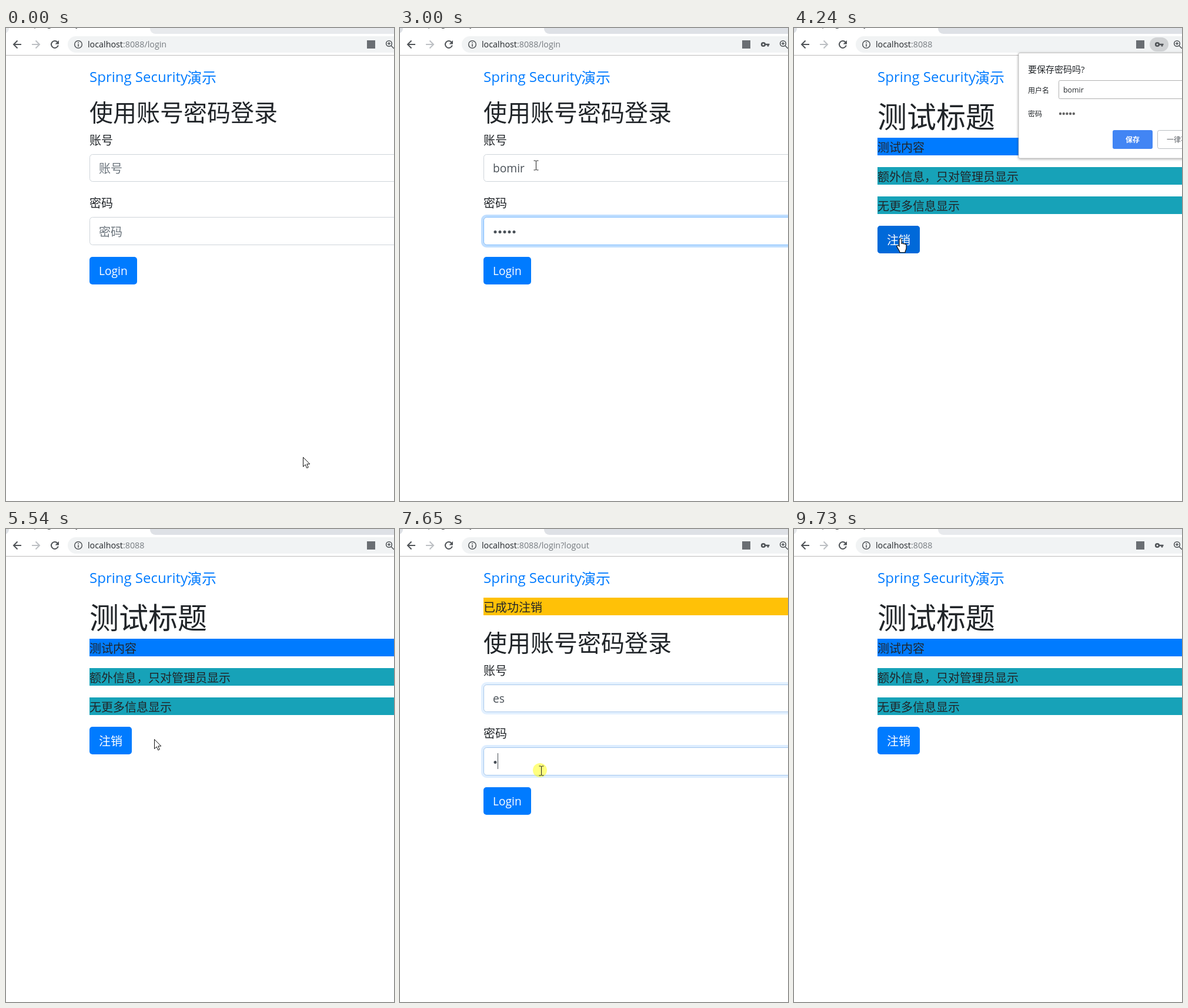
Recreate the animation shown at these times as an HTML page. Size 660 by 806 pixels, loop 9810 ms.

```html
<!DOCTYPE html>
<html lang="zh-CN">
<head>
<meta charset="utf-8">
<title>Spring Security演示</title>
<style>
  html, body { margin: 0; width: 100%; height: 100%; overflow: hidden; background: #fff; }
  svg { display: block; width: 660px; height: 806px; }
  text { font: 20px 'Open Sans', 'Noto Sans CJK SC', 'Noto Sans CJK', sans-serif; fill: #212529; white-space: pre; }
  .latin { font-size: 19.2px; }
  .brand { font-size: 25px; fill: #007bff; }
  .brand.latin { font-size: 24px; }
  .h2 { font-size: 40px; }
  .h1 { font-size: 50px; }
  .value { fill: #495057; }
  .hint { fill: #6c757d; }
  .white { fill: #fff; }
  .url { font-size: 14.3px; }
  .small { font-size: 12px; }
  .blue { fill: #007bff; }
  .teal { fill: #17a2b8; }
  .hover { fill: #0069d9; }
  .active { fill: #0062cc; }
  .field { fill: #fff; stroke: #ced4da; }
  .ring { fill: none; stroke: #007bff; stroke-width: 4; stroke-opacity: .25; }
  .ring.strong { stroke-opacity: .5; }
  .edge { fill: none; stroke: #80bdff; }
  .icon { fill: none; stroke: #505458; stroke-width: 2; }
  .bubble { filter: drop-shadow(0 1px 2px rgba(0, 0, 0, .35)); }
</style>
</head>
<body>
<svg viewBox="0 0 660 806">
  <!-- browser chrome -->
  <g id="strip">
    <rect x="-20" y="-20" width="25" height="29" rx="8"/>
    <rect x="245" y="-20" width="440" height="30" rx="9"/>
  </g>
  <text class="small" x="41" y="-2">Spring Security</text>
  <path class="icon" d="M26 28H13M19.5 21.5L13 28l6.500 6.500"/>
  <path class="icon" style="stroke:#bdc0c4" d="M44 28h13M50.500 21.500L57 28l-6.500 6.500"/>
  <g id="reload">
    <path class="icon" d="M87.500 24A6 6 0 1 0 88.800 29.500"/>
    <path fill="#505458" d="M90 21v6.500h-6.500z"/>
  </g>
  <path class="icon" data-on="8150-8260" d="M77.500 22.500l11 11m0-11l-11 11"/>
  <rect x="105" y="14" width="600" height="28" rx="14" fill="#f1f3f4"/>
  <circle class="icon" cx="123" cy="28" r="6.300" style="stroke-width:1.500"/>
  <path class="icon" d="M123 24.300v1.800m0 1.200v4.400" style="stroke-width:1.600"/>
  <text class="url" x="139" y="33">localhost<tspan id="path" fill="#777c81"></tspan></text>
  <rect id="badge" y="21" width="14" height="14" fill="#6a6e73"/>
  <rect data-on="3990-5200" x="605" y="16" width="32" height="24" rx="12" fill="#d0d2d4"/>
  <g id="key">
    <circle class="icon" cx="618" cy="28" r="2.800" style="stroke-width:2.600"/>
    <path class="icon" d="M621 28h7.500M626 28v3.500" style="stroke-width:2.600"/>
  </g>
  <circle class="icon" cx="651.500" cy="26.500" r="4.800" style="stroke-width:1.600"/>
  <path class="icon" d="M655 30l5 5M649 26.500h5m-2.500-2.500v5" style="stroke-width:1.500"/>
  <rect y="46" width="660" height="1" fill="#bdbaba"/>

  <text class="brand latin" x="142" y="92">Spring Security</text>
  <text class="brand" x="308" y="93.500">演示</text>

  <!-- sign-in page -->
  <g data-on="6240-8260">
    <rect x="142" y="117" width="518" height="30" fill="#ffc107"/>
    <text x="142" y="140.500">已成功注销</text>
  </g>
  <g id="login" data-on="0-3850 6240-8260">
    <text class="h2" x="142" y="159">使用账号密码登录</text>
    <text x="142" y="198.500">账号</text>
    <rect class="field" x="142.500" y="215.500" width="800" height="46" rx="5"/>
    <g data-on="720-1900 6785-7570" data-fade="150">
      <rect class="ring" x="140" y="213" width="805" height="51" rx="7"/>
      <rect class="edge" x="142.500" y="215.500" width="800" height="46" rx="5"/>
    </g>
    <text class="hint" id="userHint" x="158" y="246.500">账号</text>
    <text class="value latin" id="user" x="158" y="246"></text>

    <text x="142" y="305.500">密码</text>
    <rect class="field" x="142.500" y="322.500" width="800" height="47" rx="5"/>
    <g data-on="1900-3650 7570-8040" data-fade="150">
      <rect class="ring" x="140" y="320" width="805" height="52" rx="7"/>
      <rect class="edge" x="142.500" y="322.500" width="800" height="47" rx="5"/>
    </g>
    <text class="hint" id="passHint" x="158" y="354.500">密码</text>
    <g id="dots" fill="#495057"></g>
    <rect id="caret" width="1" height="27" fill="#495057"/>

    <rect class="ring strong" data-on="3650-3850 8050-8260" data-fade="130" x="140" y="388" width="85" height="51" rx="7"/>
    <rect class="blue" x="142" y="390" width="81" height="47" rx="5"/>
    <rect class="hover" data-on="3480-3850 7890-8260" data-fade="100" x="142" y="390" width="81" height="47" rx="5"/>
    <rect class="active" data-on="3650-3850 8050-8260" data-fade="100" x="142" y="390" width="81" height="47" rx="5"/>
    <text class="white latin" x="158" y="421">Login</text>
  </g>

  <!-- home page -->
  <g data-on="3850-6240 8260-9810">
    <text class="h1" x="142" y="170">测试标题</text>
    <rect class="blue" x="142" y="187" width="518" height="30"/>
    <text x="142" y="210.500">测试内容</text>
    <rect class="teal" x="142" y="237" width="518" height="30"/>
    <text x="142" y="260.500">额外信息，只对管理员显示</text>
    <rect class="teal" x="142" y="287" width="518" height="30"/>
    <text x="142" y="310.500">无更多信息显示</text>
    <rect class="ring strong" data-on="5940-6240" data-fade="150" x="140" y="335" width="76" height="51" rx="7"/>
    <rect class="blue" x="142" y="337" width="72" height="47" rx="5"/>
    <rect class="hover" data-on="4110-4420 5680-6240" data-fade="100" x="142" y="337" width="72" height="47" rx="5"/>
    <rect class="active" data-on="5940-6240" data-fade="100" x="142" y="337" width="72" height="47" rx="5"/>
    <text class="white" x="158" y="368.500">注销</text>
  </g>

  <!-- save-password bubble -->
  <g data-on="3990-5160" data-fade="80">
    <rect class="bubble" x="382" y="42.500" width="320" height="179.500" rx="2" fill="#fff" stroke="#b4b4b4" stroke-width=".7"/>
    <text x="398" y="76" style="font-size:15px">要保存密码吗?</text>
    <text class="small" x="398" y="110.500">用户名</text>
    <rect x="450.500" y="89.500" width="240" height="31" rx="2" fill="#fff" stroke="#b0b0b0"/>
    <text x="458" y="110" style="font-size:12.400px">bomir</text>
    <text class="small" x="398" y="150.500">密码</text>
    <g id="savedDots" fill="#666"></g>
    <rect x="542" y="174" width="68" height="32" rx="3" fill="#4285f4"/>
    <text class="small white" x="576" y="194.500" text-anchor="middle" font-weight="700" style="font-weight:700">保存</text>
    <rect x="618.500" y="174.500" width="110" height="31" rx="3" fill="#fff" stroke="#b9bdc1"/>
    <text class="small" x="634" y="194.500" style="fill:#5f6368">一律不保存</text>
  </g>

  <!-- pointer -->
  <g id="pointer">
    <circle data-on="700-820 3650-3770 5090-5180 5940-6060 6750-6880 7570-7680 8050-8150" cx="-2" cy="-1" r="12" fill="#ffff00" fill-opacity=".5"/>
    <path data-shape="arrow" fill="#fff" stroke="#111" d="M.500 .500v16l3.700-3.500 2.500 5.800 2.600-1.100-2.500-5.700h5z"/>
    <path data-shape="beam" fill="none" stroke="#222" d="M-3.500-8h3l1 1 1-1h3M.500-7v14M-3.500 8h3l1-1 1 1h3"/>
    <path data-shape="hand" fill="#fff" stroke="#111" stroke-width="1.200" d="M-2 13V2a2 2 0 0 1 4 0V9c0-2 3-2 3 .5c0-2 2.800-1.500 2.800.7c0-1.600 2.200-1.500 2.200.6V16c0 3-2 4-2 7.500H-1c0-3-4-7-5-10c-.6-2 2-3 4-.5z"/>
  </g>
</svg>
<script>
const LOOP = 9810;
const $ = id => document.getElementById(id);
const clamp = v => Math.max(0, Math.min(1, v));

// Each list holds [time, value]; a value stays until the next time.
const user = [[0, ''], [1030, 'b'], [1200, 'bo'], [1440, 'bom'], [1500, 'bomi'], [1670, 'bomir'],
  [6240, ''], [7180, 'e'], [7330, 'es']];
const pass = [[0, 0], [2050, 1], [2220, 2], [2300, 3], [2380, 4], [2460, 5], [6240, 0], [7650, 1], [7720, 2]];
const path = [[0, ':8088/login'], [3850, ':8088'], [6240, ':8088/login?logout'], [8260, ':8088']];
const focus = [[0, ''], [720, 'user'], [1940, 'pass'], [3000, ''], [6760, 'user'], [7570, 'pass'], [8050, '']];
const key = [[0, false], [2050, true], [5200, false], [7650, true]];
const strip = [[0, '#e8eaed'], [720, '#dee1e6'], [9350, '#e8eaed']];
const shape = [[0, 'arrow'], [620, 'beam'], [3230, 'arrow'], [3480, 'hand'], [3850, 'arrow'], [4130, 'hand'],
  [4440, 'arrow'], [5680, 'hand'], [6240, 'arrow'], [6560, 'beam'], [7260, 'arrow'], [7360, 'beam'],
  [7830, 'arrow'], [7890, 'hand'], [8420, 'arrow'], [9350, 'none']];
// Pointer hotspot: [time, x, y]
const route = [[0, 505, 731], [40, 505, 731], [680, 231, 234], [3100, 231, 234], [3560, 195, 430],
  [3880, 195, 430], [4090, 183, 384], [4230, 181, 359], [4330, 181, 359], [4860, 648, 150], [4940, 648, 150],
  [5080, 645, 190], [5170, 645, 190], [5540, 252, 358], [5770, 179, 366], [6400, 179, 366],
  [6720, 246, 288], [7180, 246, 288], [7420, 240, 412], [7760, 240, 412], [7950, 200, 452],
  [8350, 200, 452], [8570, 275, 434], [9350, 592, 808]];

const step = (list, t) => list.filter(k => k[0] <= t).pop()[1];

function locate(t) {
  const i = route.findIndex(p => p[0] > t);
  if (i < 0) return route[route.length - 1].slice(1);
  const [t0, x0, y0] = route[i - 1], [t1, x1, y1] = route[i];
  const u = (t - t0) / (t1 - t0), e = u * u * (3 - 2 * u);
  return [x0 + (x1 - x0) * e, y0 + (y1 - y0) * e];
}

function addDots(group, x, y, gap, r) {
  for (let i = 0; i < 5; i++) {
    const c = document.createElementNS('http://www.w3.org/2000/svg', 'circle');
    c.setAttribute('cx', x + gap * i);
    c.setAttribute('cy', y);
    c.setAttribute('r', r);
    group.append(c);
  }
}
addDots($('dots'), 162, 347.5, 8, 2.5);
addDots($('savedDots'), 453, 146, 5.7, 2.2);

const timed = [...document.querySelectorAll('[data-on]')].map(el => ({
  el,
  fade: +el.dataset.fade || 0,
  spans: el.dataset.on.split(' ').map(s => s.split('-').map(Number))
}));
const shapes = [...document.querySelectorAll('[data-shape]')];
const show = (el, on) => { el.style.display = on ? '' : 'none'; };

function level(spans, fade, t) {
  return Math.max(...spans.map(([a, b]) => fade
    ? Math.min(clamp((t - a) / fade), clamp((b + fade - t) / fade))
    : +(t >= a && t < b)));
}

function draw(t) {
  for (const { el, fade, spans } of timed) {
    const v = level(spans, fade, t);
    show(el, v > 0);
    el.style.opacity = v;
  }
  $('strip').setAttribute('fill', step(strip, t));
  $('path').textContent = step(path, t);
  show($('reload'), t < 8150 || t >= 8260);
  const hasKey = step(key, t);
  show($('key'), hasKey);
  $('badge').setAttribute('x', hasKey ? 582 : 614);

  $('login').setAttribute('transform', `translate(0 ${t < 6240 ? 0 : 50})`);
  const name = step(user, t), count = step(pass, t), field = step(focus, t);
  $('user').textContent = name;
  show($('userHint'), !name);
  show($('passHint'), !count);
  [...$('dots').children].forEach((c, i) => show(c, i < count));
  const inUser = field === 'user';
  show($('caret'), field);
  $('caret').setAttribute('x', 158 + Math.round(inUser ? (name && $('user').getComputedTextLength()) : count * 8.2));
  $('caret').setAttribute('y', inUser ? 225 : 332);

  const kind = step(shape, t), [x, y] = locate(t);
  shapes.forEach(s => show(s, s.dataset.shape === kind));
  $('pointer').setAttribute('transform', `translate(${Math.round(x)} ${Math.round(y)})`);
}

const start = performance.now();
function tick() {
  draw((performance.now() - start) % LOOP);
  requestAnimationFrame(tick);
}
tick();
</script>
</body>
</html>
```
